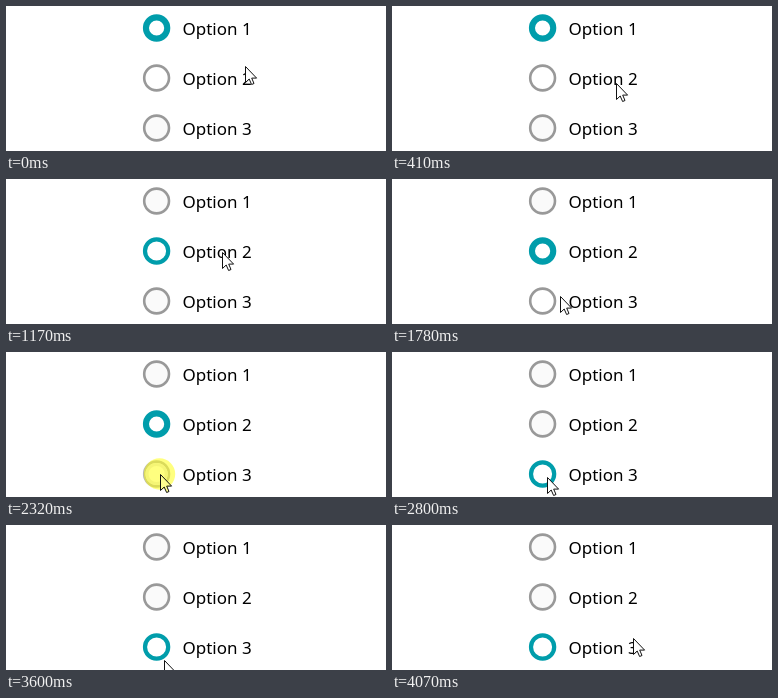
These frames come from a looping animation (380x145 px, 4.14 s). An HTML page:

```html
<!DOCTYPE html>
<html lang="en">
<head>
<meta charset="utf-8">
<title>Radio options</title>
<style>
  html, body { margin: 0; width: 100%; height: 100%; overflow: hidden; background: #fff; }
  svg { display: block; width: 380px; height: 145px; }
  text { font: 17px "Noto Sans", "Open Sans", sans-serif; fill: #000; }
</style>
</head>
<body>
<svg id="stage" viewBox="0 0 380 145"></svg>
<script>
const LOOP = 4140, STEP = 70, CX = 150.6;
const TEAL = '#009dab', GREY = '#999';
const stage = document.getElementById('stage');

function add(tag, attrs, parent = stage) {
  const el = document.createElementNS('http://www.w3.org/2000/svg', tag);
  set(el, attrs);
  return parent.appendChild(el);
}
function set(el, attrs) {
  for (const key in attrs) el.setAttribute(key, attrs[key]);
}

// Pointer moves: start time, number of steps, end x, end y
const START = [239, 60];
const MOVES = [
  [70, 1, 236, 60], [270, 4, 220, 82], [690, 3, 216, 73],
  [1430, 6, 168, 117], [1850, 2, 156, 122], [2050, 2, 154, 122],
  [2800, 3, 156, 130], [3140, 1, 156, 127], [3270, 1, 159, 139],
  [3600, 2, 156, 131], [3930, 3, 241, 113]
];
// Presses: row, mouse down, mouse up
const PRESSES = [[1, 970, 1170], [2, 2320, 2590]];

const rows = [22, 72, 122].map((cy, i) => {
  const ring = add('circle', { cx: CX, cy });
  const inner = add('circle', { cx: CX, cy, r: 9.6, fill: 'none' });
  add('text', { x: 176.5, y: cy + 7 }).textContent = 'Option ' + (i + 1);
  return { cy, ring, inner };
});
const glow = add('circle', { r: 15.7, fill: '#ffff00', 'fill-opacity': 0.5 });
const pointer = add('path', {
  d: 'M.5 .5V16.5L4.2 13L6.6 18.5L9 17.5L6.7 12.1H11.6Z',
  stroke: '#111', 'stroke-width': 1, 'stroke-linejoin': 'round'
});

function pointerAt(t) {
  let [x, y] = START;
  for (const [start, count, toX, toY] of MOVES) {
    if (t < start) break;
    const done = Math.min(count, Math.floor((t - start) / STEP) + 1) / count;
    x += (toX - x) * done;
    y += (toY - y) * done;
  }
  return [Math.round(x), Math.round(y)];
}

function drawRow({ cy, ring, inner }, selected, hover, pressed) {
  const width = selected ? (hover ? 4.2 : 6.1) : 2.6;
  set(ring, {
    r: 13.7 - width / 2,
    'stroke-width': width,
    stroke: selected ? TEAL : pressed ? '#b8b8b8' : GREY,
    fill: selected || hover ? '#fff' : '#fafafa'
  });
  set(inner, { stroke: pressed ? '#ececec' : 'none', 'stroke-width': 3 });
}

function draw(t) {
  const [x, y] = pointerAt(t);
  let chosen = 0, down = -1;
  for (const [row, from, to] of PRESSES) {
    if (t >= to) chosen = row;
    else if (t >= from) down = row;
  }
  rows.forEach((row, i) =>
    drawRow(row, i === chosen, Math.abs(y - row.cy) < 15, i === down));
  set(glow, { cx: x - 0.5, cy: y, visibility: down < 0 ? 'hidden' : 'visible' });
  set(pointer, {
    transform: `translate(${x} ${y})`,
    fill: down < 0 ? '#fff' : '#ffff90'
  });
}

let origin;
function tick(now) {
  origin ??= now;
  draw((now - origin) % LOOP);
  requestAnimationFrame(tick);
}
draw(0);
requestAnimationFrame(tick);
</script>
</body>
</html>
```
